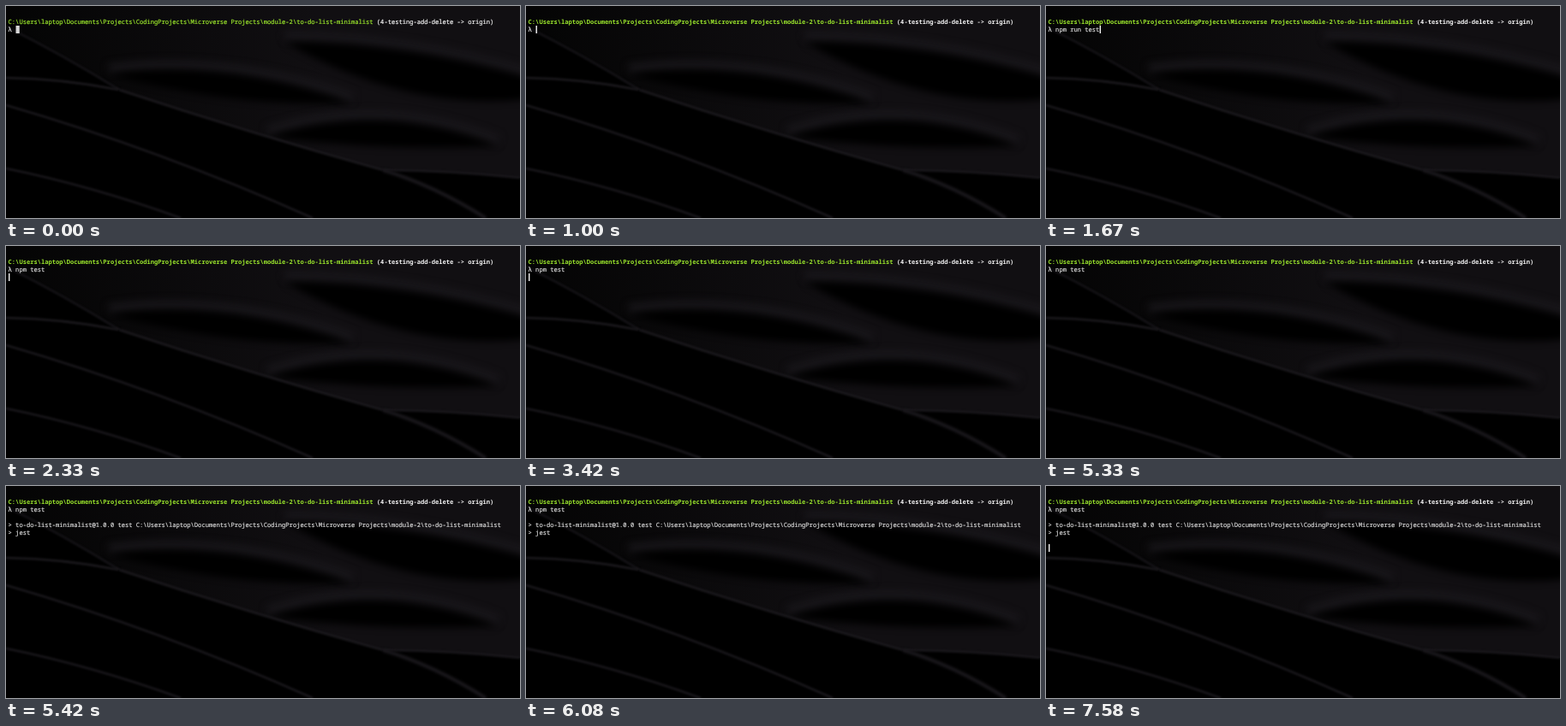
An HTML page with a canvas for the animation above (8000 ms loop, 600 px wide and 248 px high).

```html
<!DOCTYPE html>
<html lang="en">
<head>
<meta charset="utf-8">
<title>Terminal test run</title>
<style>
html, body { margin: 0; width: 100%; height: 100%; overflow: hidden; background: #000; }
canvas { display: block; }
</style>
</head>
<body>
<canvas id="stage" width="600" height="248"></canvas>
<script>
const W = 600, H = 248, LOOP = 8000;
const CELL = 4.26, LEFT = 2.6, TOP = 14, ROW = 9;
const GREEN = '#9be62c', WHITE = '#f4f4f4', GRAY = '#d6d6d6';
const PATH = 'C:\\Users\\laptop\\Documents\\Projects\\CodingProjects\\Microverse Projects\\module-2\\to-do-list-minimalist';
const BRANCH = '(4-testing-add-delete -> origin)';

const ctx = document.getElementById('stage').getContext('2d');
const backdrop = document.createElement('canvas');
backdrop.width = W;
backdrop.height = H;

function paintFabric(g) {
  const soften = blur => { g.filter = `blur(${blur}px)`; };

  // Arc between two points; sag moves its middle down (or up if negative).
  const arc = (a, b, sag) =>
    new Path2D(`M${a} Q${(a[0] + b[0]) / 2},${(a[1] + b[1]) / 2 + 2 * sag} ${b}`);

  const stroke = (path, color, width, blur) => {
    soften(blur);
    g.strokeStyle = color;
    g.lineWidth = width;
    g.stroke(path);
  };

  // Cloth edge: black below, a faint light along the rim.
  const fold = (a, b, sag, rim) => {
    const edge = arc(a, b, sag), below = new Path2D(edge);
    below.lineTo(b[0], H + 10);
    below.lineTo(a[0], H + 10);
    soften(0.5);
    g.fillStyle = '#000';
    g.fill(below);
    stroke(edge, rim, 2.5, 0.8);
  };

  // Soft dark lens with a lighter crest above it.
  const hollow = (a, b, sag, depth) => {
    stroke(arc([a[0], a[1] - 7], [b[0], b[1] - 7], sag), '#1a181c', 9, 5);
    const lens = arc(a, b, sag);
    lens.quadraticCurveTo((a[0] + b[0]) / 2, (a[1] + b[1]) / 2 + 2 * (sag + depth), ...a);
    soften(4);
    g.fillStyle = '#000';
    g.fill(lens);
  };

  const base = g.createLinearGradient(0, 60, W * 0.6, 0);
  base.addColorStop(0, '#040404');
  base.addColorStop(1, '#110f12');
  g.fillStyle = base;
  g.fillRect(0, 0, W, H);

  hollow([120, 80], [405, 114], -17, 28);
  hollow([325, 42], [660, 100], -14, 48);
  hollow([305, 153], [575, 164], -24, 30);

  const knot = [132, 98], fork = [440, 192];
  fold([0, 24], knot, -2, '#161418');
  fold(fork, [W, 201], -2, '#1a181c');
  fold(knot, fork, 2, '#1b191d');
  fold([0, 84], knot, -3, '#1b191d');
  stroke(arc(fork, [560, H], -5), '#19171b', 4, 1.5);
  fold([0, 116], [358, H], -7, '#19171b');
  fold([0, 190], [204, H], -4, '#19171b');
  g.filter = 'none';
}

function text(str, col, row, color, bold) {
  ctx.font = `${bold ? 700 : 400} 7.1px "Noto Sans Mono", "DejaVu Sans Mono", monospace`;
  ctx.fillStyle = ctx.strokeStyle = color;
  ctx.lineWidth = 0.2;
  [...str].forEach((ch, i) => {
    if (ch === ' ') return;
    const x = LEFT + (col + i) * CELL, y = TOP + row * ROW + 7;
    ctx.fillText(ch, x, y);
    if (!bold) ctx.strokeText(ch, x, y);
  });
}

function cursor(col, row, width = 1.4) {
  ctx.fillRect(LEFT + 0.4 + col * CELL, TOP + row * ROW, width, 9);
}

const within = (t, ...spans) => spans.some(([a, b]) => t >= a && t < b);

function commandAt(t) {
  if (t < 1670) return '';
  return t < 2170 ? 'npm run test' : 'npm test';
}

function draw(t) {
  const focused = t >= 1000;
  const command = commandAt(t);

  ctx.drawImage(backdrop, 0, 0);
  text(PATH, 0, 0, GREEN, focused);
  text(BRANCH, PATH.length + 1, 0, WHITE, focused);
  text('λ', 0, 1, WHITE);
  text(command, 2, 1, GRAY);
  if (t >= 5420) {
    text('> to-do-list-minimalist@1.0.0 test ' + PATH, 0, 3, GRAY);
    text('> jest', 0, 4, GRAY);
  }

  ctx.fillStyle = focused ? WHITE : GRAY;
  if (!focused) {
    cursor(2, 1, CELL);
  } else if (within(t, [1000, 1500], [1670, 2330])) {
    cursor(2 + command.length, 1);
  } else if (within(t, [2330, 2830], [3420, 3920], [4420, 5000])) {
    cursor(0, 2);
  } else if (within(t, [5500, 6000], [6500, 7000], [7580, LOOP])) {
    cursor(0, 6);
  }
}

paintFabric(backdrop.getContext('2d'));
ctx.textRendering = 'geometricPrecision';
const start = performance.now();
function tick() {
  draw((performance.now() - start) % LOOP);
  requestAnimationFrame(tick);
}
tick();
</script>
</body>
</html>
```
